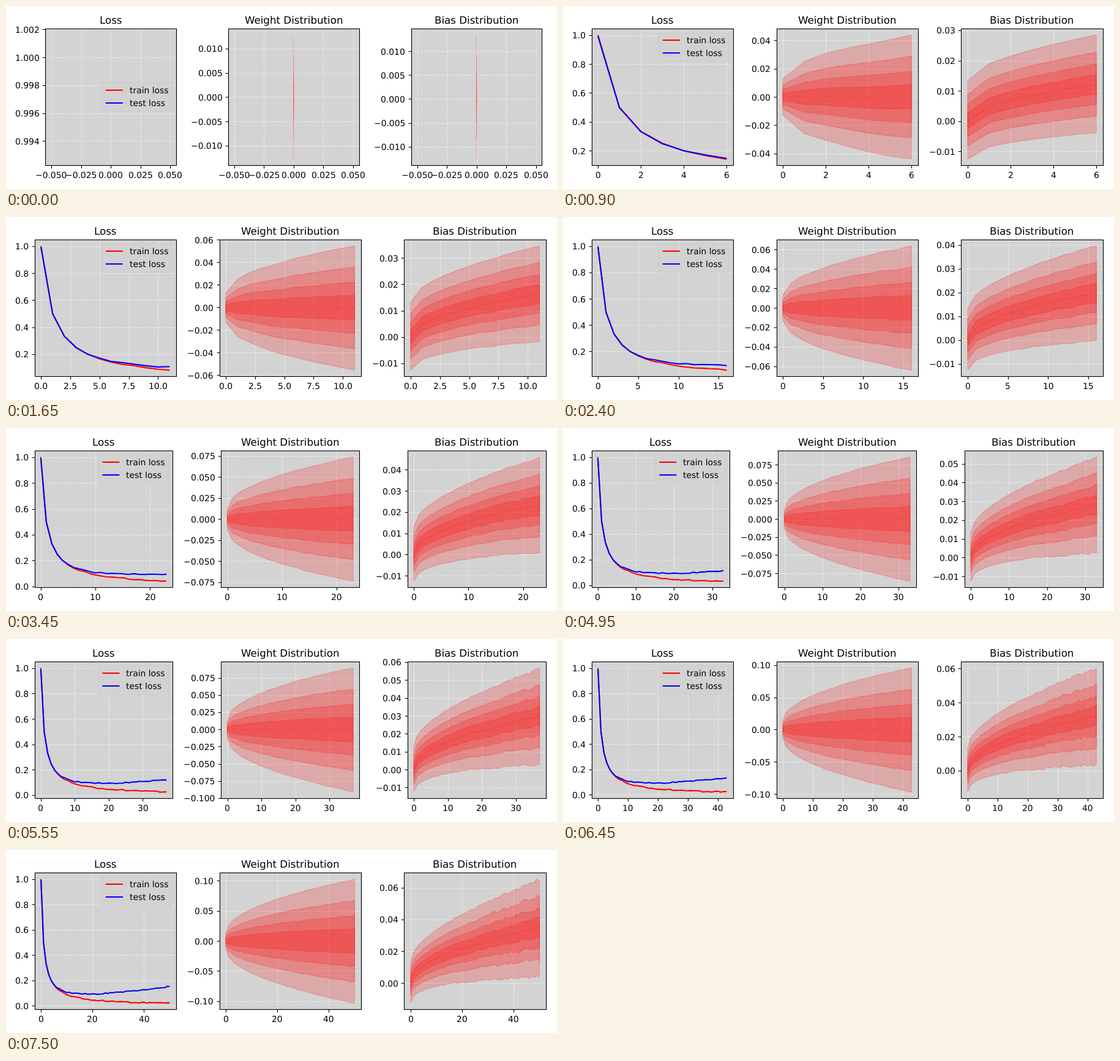
Animation of 900 by 300 pixels, one loop 7650 ms. Source, as an HTML page with a canvas:

```html
<!DOCTYPE html>
<html lang="en">
<head>
<meta charset="utf-8">
<title>Training curves</title>
<style>
html, body { margin: 0; width: 100%; height: 100%; overflow: hidden; background: #fff; }
canvas { display: block; }
</style>
</head>
<body>
<canvas id="stage" width="900" height="300"></canvas>
<script>
const ctx = document.getElementById('stage').getContext('2d');
const STEPS = 51, STEP_MS = 150, TOP = 37.33, BOTTOM = 261.28;
const PT = 100 / 72, FONT = '"DejaVu Sans", sans-serif';
const MINUS = '\u2212';

// Repeatable noise from -1 to 1
function noise(n, seed) {
  const s = Math.sin(n * 127.1 + seed * 311.7) * 43758.5453;
  return (s - Math.floor(s)) * 2 - 1;
}

// Both losses fall as 1 / (1 + n); the test loss creeps up again
const lossNoise = (n, seed) => noise(n, seed) * .005 * Math.min(1, n / 10);
const trainAt = n => 1.0016 / (1 + n) + lossNoise(n, 5);
const testAt = n => .9927 / (1 + n) + .0029 * Math.max(0, n - 4) + lossNoise(n, 6);

// Nine deciles of a normal distribution, from low to high
const spread = [1, .656, .41, .198];
function deciles(mid, below, above, n, seed, rough) {
  const jitter = i => noise(n, seed + i) * rough * n / 50;
  const lows = spread.map((r, i) => mid - below * r + jitter(i));
  const highs = spread.map((r, i) => mid + above * r + jitter(i + 4));
  return [...lows, mid, ...highs.reverse()];
}
function weightAt(n) {
  const root = Math.sqrt(n);
  return deciles(noise(n, 3) * .0005, .0129 + .0128 * root, .0127 + .01265 * root, n, 10, .0002);
}
function biasAt(n) {
  const mid = .0049 * Math.sqrt(n) + noise(n, 4) * .001 * n / 50, growth = n ** .8;
  return deciles(mid, .0126 + .0008 * growth, .0134 + .00072 * growth, n, 30, .0008);
}

const steps = [...Array(STEPS).keys()];
const train = steps.map(trainAt), test = steps.map(testAt);
const weights = steps.map(weightAt), biases = steps.map(biasAt);

// Round tick step, and the decimals its labels need
function tickStep(raw) {
  const base = 10 ** Math.floor(Math.log10(raw));
  return base * [1, 2, 2.5, 5, 10].find(s => s * base >= raw * (1 - 1e-9));
}
function decimals(step) {
  let d = 0;
  while (Math.abs(step * 10 ** d - Math.round(step * 10 ** d)) > 1e-6) d++;
  return d;
}

function makeAxis(lo, hi, bins, length) {
  const step = tickStep((hi - lo) / bins), d = decimals(step), slack = (hi - lo) * .7 / length;
  const ticks = [];
  for (let i = Math.ceil((lo - slack) / step); i * step <= hi + slack; i++)
    ticks.push({ value: i * step, label: (i * step).toFixed(d).replace('-', MINUS) });
  return { lo, hi, d, ticks };
}
function yAxis(values) {
  const lo = Math.min(...values), hi = Math.max(...values), m = (hi - lo) * .05;
  return makeAxis(lo - m, hi + m, 8, BOTTOM - TOP);
}

const setFont = pt => ctx.font = pt * PT + 'px ' + FONT;
const snap = v => Math.floor(v + .5) + .5;

// align: 0 left, .5 centre, 1 right
function text(s, x, y, align) {
  ctx.fillText(s, Math.round(x - ctx.measureText(s).width * align), Math.round(y));
}
function segment(x1, y1, x2, y2) {
  ctx.beginPath();
  ctx.moveTo(x1, y1);
  ctx.lineTo(x2, y2);
  ctx.stroke();
}

function panel(title, x0, x1, xa, ya, drawData) {
  const px = v => x0 + (v - xa.lo) / (xa.hi - xa.lo) * (x1 - x0);
  const py = v => BOTTOM - (v - ya.lo) / (ya.hi - ya.lo) * (BOTTOM - TOP);
  const left = snap(x0), right = snap(x1), top = snap(TOP), bottom = snap(BOTTOM);

  ctx.fillStyle = '#d3d3d3';
  ctx.fillRect(left, top, right - left, bottom - top);

  ctx.save();
  ctx.beginPath();
  ctx.rect(left, top, right - left, bottom - top);
  ctx.clip();
  ctx.strokeStyle = '#fff';
  ctx.lineWidth = .8 * PT;
  ctx.setLineDash([.8 * PT, 1.32 * PT]);
  for (const t of xa.ticks) segment(snap(px(t.value)), bottom, snap(px(t.value)), top);
  for (const t of ya.ticks) segment(left, snap(py(t.value)), right, snap(py(t.value)));
  ctx.setLineDash([]);
  ctx.lineJoin = 'round';
  drawData(px, py);
  ctx.restore();

  ctx.strokeStyle = ctx.fillStyle = '#000';
  ctx.lineWidth = .8 * PT;
  ctx.strokeRect(left, top, right - left, bottom - top);
  setFont(10);
  for (const t of xa.ticks) {
    const x = px(t.value);
    segment(snap(x), bottom, snap(x), bottom + 3.5 * PT);
    text(t.label, x, 282, .5);
  }
  for (const t of ya.ticks) {
    const y = py(t.value);
    segment(left, snap(y), left - 3.5 * PT, snap(y));
    text(t.label, x0 - 7 * PT, y + 5.5, 1);
  }
  setFont(12);
  text(title, (x0 + x1) / 2, 29, .5);
}

function trace(values, px, py) {
  ctx.beginPath();
  values.forEach((v, i) => ctx.lineTo(px(i), py(v)));
}

function drawLosses(n, px, py) {
  ctx.lineWidth = 1.5 * PT;
  for (const [values, color] of [[train, '#f00'], [test, '#00f']]) {
    ctx.strokeStyle = color;
    trace(values.slice(0, n + 1), px, py);
    if (n) ctx.stroke();
  }
}

function drawBands(rows, px, py) {
  ctx.fillStyle = ctx.strokeStyle = 'rgba(255,0,0,.2)';
  ctx.lineWidth = PT;
  for (let k = 0; k < 4; k++) {
    trace(rows.map(r => r[k]), px, py);
    for (let i = rows.length - 1; i >= 0; i--) ctx.lineTo(px(i), py(rows[i][8 - k]));
    ctx.closePath();
    ctx.fill();
    ctx.stroke();
  }
  trace(rows.map(r => r[4]), px, py);
  if (rows.length > 1) ctx.stroke();
}

function legend(right, y) {
  ctx.beginPath();
  ctx.roundRect(right - 121.3, y, 114.4, 46.5, 2.8);
  ctx.fillStyle = 'rgba(211,211,211,.8)';
  ctx.fill();
  ctx.strokeStyle = 'rgba(204,204,204,.8)';
  ctx.lineWidth = PT;
  ctx.stroke();
  setFont(10);
  ctx.fillStyle = '#000';
  ctx.lineWidth = 1.5 * PT;
  [['train loss', '#f00', 12], ['test loss', '#00f', 33]].forEach(([label, color, dy]) => {
    const ly = Math.round(y + dy);
    ctx.strokeStyle = color;
    segment(right - 115.2, ly, right - 87, ly);
    text(label, right - 76, ly + 5, 0);
  });
}

function draw(n) {
  const w = weights.slice(0, n + 1), b = biases.slice(0, n + 1);
  const xa = n ? makeAxis(-.05 * n, 1.05 * n, 5, 225) : makeAxis(-.055, .055, 5, 225);
  const la = yAxis([...train.slice(0, n + 1), ...test.slice(0, n + 1)]);
  const wa = yAxis(w.flat()), ba = yAxis(b.flat());

  // Margins follow the widest tick labels
  setFont(10);
  const last = xa.ticks[xa.ticks.length - 1];
  const room = (xa.hi - last.value) / (xa.hi - xa.lo) * 225;
  const over = Math.max(3.2, ctx.measureText(last.label).width / 2 - room);
  const left = la.d > 1 ? 64.3 : 46.6;
  const gap = over + (Math.max(wa.d, ba.d) > 2 ? 75.6 : 67.4);
  const width = (885 - over - left - 2 * gap) / 3;
  const start = i => left + i * (width + gap);

  ctx.fillStyle = '#fff';
  ctx.fillRect(0, 0, 900, 300);
  const add = (i, title, ya, data) => panel(title, start(i), start(i) + width, xa, ya, data);
  add(0, 'Loss', la, (px, py) => drawLosses(n, px, py));
  legend(left + width, n ? 44.4 : 126);
  add(1, 'Weight Distribution', wa, (px, py) => drawBands(w, px, py));
  add(2, 'Bias Distribution', ba, (px, py) => drawBands(b, px, py));
}

let begin, shown = -1;
function tick(now) {
  begin ??= now;
  const n = Math.floor(Math.max(0, now - begin) / STEP_MS) % STEPS;
  if (n !== shown) draw(shown = n);
  requestAnimationFrame(tick);
}
ctx.textRendering = 'geometricPrecision';
draw(0);
requestAnimationFrame(tick);
</script>
</body>
</html>
```
